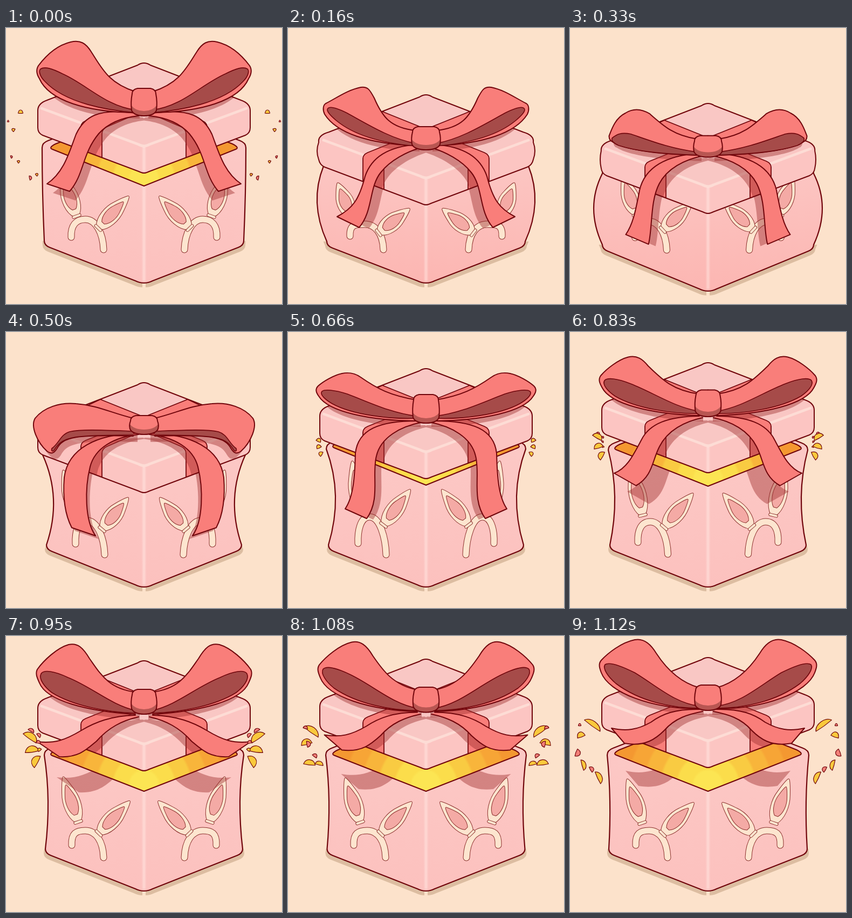
An HTML page with a canvas for the animation above (1.29 s loop, 512 by 512 pixels).

```html
<!DOCTYPE html>
<html lang="en">
<head>
<meta charset="utf-8">
<title>Gift box</title>
<style>
html, body { margin: 0; height: 100%; overflow: hidden; background: #fce2cb; }
canvas { display: block; width: 100vw; height: 100vh; }
</style>
</head>
<body>
<canvas width="512" height="512"></canvas>
<script>
const ctx = document.querySelector('canvas').getContext('2d');
const LINE = '#70050b', CORAL = '#f97e7a', PINK = '#fcc5c2', CREAM = '#fde5cf', SHADE = 'rgba(160,50,50,.45)';

// Left half only; the right half is its mirror image.
// lid: top, bulge   body: corner x, y, waist x, foot x, y, apex   hole: tip y, apex y
// bunny: left base, tip, right base, tip, band end, crown, end   bits: x, y, length, width, angle
const open = {
  lid: [65, 0], body: [67, 216, 68, 71, 395, 473], hole: [222, 293], knot: [232, 112, 163], cast: [11, 17],
  bow: [240,118, 190,102,178,75,158,44, 148,28,138,22,120,26, 95,32,75,50,60,70, 55,78,57,86,62,94, 80,135,150,156,240,157],
  fold: [240,152, 185,145,150,105,105,85, 85,75,72,71,64,76, 60,80,63,90,72,99, 110,140,190,153,240,157],
  tail: [240,158, 170,148,145,165,130,197, 118,228,108,268,76,289, 118,303, 146,270,140,235,172,196, 190,176,215,166,246,163],
  bunny: [131,349, 103,272, 171,371, 228,312, 121,388, 147,355, 181,411],
  bits: [27,156,9,6,0, 14,189,6,5,-60, 23,248,5,4,60, 57,272,5,4,50, 4,173,3,3,0, 10,239,5,3,70, 45,278,8,4,80]
};
const land = {
  lid: [124, 4], body: [66, 250, 54, 72, 396, 473], hole: [254, 318], knot: [229, 183, 226], cast: [18, 2],
  bow: [236,190, 190,185,175,165,160,130, 152,115,148,108,135,110, 110,115,90,130,70,140, 65,143,64,152,68,160, 90,195,150,215,236,218],
  fold: [236,214, 190,205,150,180,110,158, 90,148,78,145,74,149, 70,153,78,162,90,172, 130,205,190,215,236,219],
  tail: [240,216, 185,220,155,240,143,275, 132,318,120,335,91,350, 132,370, 158,340,150,295,172,268, 190,245,220,230,246,222],
  bunny: [117,350, 92,287, 168,380, 226,335, 115,386, 142,364, 177,411],
  bits: []
};
const rise = {
  lid: [94, 0], body: [68, 222, 88, 75, 395, 473], hole: [225, 288], knot: [229, 155, 190], cast: [6, 6],
  bow: [236,160, 195,150,170,136,130,133, 100,130,70,140,54,160, 45,175,58,205,76,221, 84,227,89,225,94,217, 106,194,130,190,236,193],
  fold: [236,184, 180,182,140,180,118,185, 101,190,99,206,85,216, 83,222,88,223,91,217, 106,192,130,192,236,191],
  tail: [240,188, 170,190,115,215,108,270, 105,310,110,340,122,363, 166,378, 146,350,146,290,156,250, 165,215,200,195,246,190],
  bunny: [133,340, 106,256, 178,366, 227,307, 129,393, 150,350, 183,413],
  bits: []
};
const pop = {
  lid: [68, 0], body: [71, 211, 88, 75, 395, 473], hole: [212, 284], knot: [231, 116, 169], cast: [12, 2],
  bow: [238,126, 190,118,165,105,135,84, 125,77,115,74,100,77, 85,80,65,92,56,100, 50,106,52,112,57,119, 75,148,150,164,238,165],
  fold: [238,156, 190,150,150,130,110,115, 85,107,68,106,63,110, 58,116,70,126,82,133, 120,154,190,162,238,160],
  tail: [240,165, 170,165,130,180,125,225, 124,265,122,305,106,328, 146,346, 172,310,155,265,164,230, 172,195,210,175,246,168],
  bunny: [136,335, 119,239, 177,358, 227,292, 130,392, 151,343, 182,413],
  bits: [57,201,9,6,25, 57,213,9,6,-25, 61,226,9,6,-60, 61,215,0,0,0, 58,200,0,0,30, 61,206,0,0,45, 61,210,0,0,60]
};
const fling = {
  lid: [46, 0], body: [71, 215, 78, 73, 395, 473], hole: [219, 288], knot: [232, 99, 145], cast: [36, 66],
  bow: [240,104, 190,98,175,70,155,42, 143,22,133,12,116,16, 95,22,70,45,58,62, 54,70,58,78,62,87, 75,120,150,140,240,145],
  fold: [240,138, 195,128,160,95,115,77, 90,65,70,62,65,70, 60,80,72,95,85,105, 125,130,190,142,240,143],
  tail: [240,147, 195,148,165,160,140,175, 110,193,90,200,58,196, 99,224, 135,226,150,210,168,195, 190,170,215,157,246,150],
  bunny: [134,345, 106,261, 172,366, 230,306, 122,388, 147,361, 181,411],
  bits: [46,187,30,11,35, 48,211,26,11,-8, 55,232,24,11,-62, 62,211,7,5,-40, 47,175,12,5,30, 61,184,9,5,50, 60,197,8,5,15]
};
const peak = {
  lid: [40, 0], body: [69, 215, 74, 72, 395, 473], hole: [218, 288], knot: [231, 91, 138], cast: [26, 79],
  bow: [240,96, 200,85,175,55,160,32, 148,12,135,4,120,7, 95,12,70,32,58,45, 52,52,55,60,58,68, 72,105,150,135,240,135],
  fold: [240,130, 195,125,160,92,120,68, 90,53,72,48,65,53, 60,60,70,75,85,88, 130,122,190,134,240,134],
  tail: [240,136, 195,135,170,145,150,160, 125,174,105,177,77,171, 101,199, 140,206,160,190,175,175, 195,152,220,145,246,140],
  bunny: [134,347, 106,265, 172,367, 230,309, 122,388, 147,361, 181,411],
  bits: [43,164,36,9,36, 20,184,15,9,-20, 25,239,20,7,75, 54,262,24,8,65, 18,165,5,4,0, 14,217,14,8,110, 40,247,11,6,60]
};

const mix = (a, b, t) => Object.fromEntries(Object.keys(a).map(k => [k, a[k].map((v, i) => v + (b[k][i] - v) * t)]));
const squash = { ...mix(land, rise, .4), body: [60, 264, 44, 60, 402, 488], hole: [266, 334], drop: 28 };

// Each pose is held until its end time.
const steps = [
  [160, open], [330, land], [500, squash], [660, rise], [830, pop],
  [950, mix(pop, fling, .5)], [1080, fling], [1120, mix(fling, peak, .5)], [1290, peak]
];

function curve(n, cmds) {
  let i = 2, d = `M${n[0]} ${n[1]}`;
  for (const c of cmds) d += c + n.slice(i, i += c === 'C' ? 6 : 2).join(' ');
  return new Path2D(d);
}

function paint(path, fill, stroke, width = 2) {
  if (fill) { ctx.fillStyle = fill; ctx.fill(path); }
  if (stroke) { ctx.strokeStyle = stroke; ctx.lineWidth = width; ctx.stroke(path); }
}

function both(draw, dy = 0) {
  for (const side of [1, -1]) {
    ctx.setTransform(side, 0, 0, 1, side < 0 ? 512 : 0, dy);
    draw();
  }
  ctx.resetTransform();
}

function shadow(clip, path, dx, dy) {
  ctx.save();
  ctx.clip(clip);
  ctx.translate(dx, dy);
  paint(path, SHADE);
  ctx.restore();
}

function bodyPath([x, y, waist, foot, fy, apex]) {
  return new Path2D(`M256 ${y - 76} L${x + 11} ${y - 7} Q${x} ${y - 3} ${x} ${y + 6}
    Q${2 * waist - (x + foot) / 2} ${(y + fy) / 2} ${foot} ${fy} Q${foot} ${fy + 8} ${foot + 10} ${fy + 12}
    L240 ${apex - 4} Q248 ${apex} 256 ${apex}`);
}

function lidPath([t, b]) {
  return new Path2D(`M256 ${t} Q250 ${t} 244 ${t + 4} L76 ${t + 69} Q${59 - b} ${t + 75} ${59 - b / 2} ${t + 88}
    Q${59 - 2 * b} ${t + 104} ${59 - b / 2} ${t + 120} Q59 ${t + 130} 68 ${t + 134} L246 ${t + 201} Q252 ${t + 204} 256 ${t + 204}`);
}

function ear(bx, by, tx, ty) {
  const l = Math.hypot(tx - bx, ty - by);
  const leaf = (o, k) => {
    const p = (f, w) => `${(o + f * k) * l} ${w * k} `, L = s =>
      `${p(.15, 17 * s)}${p(.45, 19 * s)}${p(.68, 12 * s)}`;
    return new Path2D(`M${p(0, -5)}C${L(-1)}Q${p(.9, -6)}${p(.98, -2)}Q${p(1.02, 0)}${p(.98, 2)}
      Q${p(.9, 6)}${p(.68, 12)}C${p(.45, 19)}${p(.15, 17)}${p(0, 5)}Z`);
  };
  ctx.save();
  ctx.translate(bx, by);
  ctx.rotate(Math.atan2(ty - by, tx - bx));
  paint(leaf(0, 1), CREAM, '#8a2f2c', 1);
  paint(leaf(.16, .66), '#f4aaa5', '#8a2f2c', 1);
  const cuff = new Path2D('M0 -6V6');
  paint(cuff, 0, '#8a2f2c', 6);
  paint(cuff, 0, CREAM, 4.2);
  ctx.restore();
}

function bunny([a, b, c, d, e, f, g, h, x1, y1, x, y, x2, y2]) {
  const band = new Path2D(`M${x1} ${y1} C${x1 - 1} ${y1 - 22} ${x - 17} ${y} ${x} ${y} C${x + 20} ${y} ${x2 - 1} ${y2 - 30} ${x2} ${y2}`);
  paint(band, 0, '#8a2f2c', 13);
  paint(band, 0, CREAM, 11);
  ear(a, b, c, d);
  ear(e, f, g, h);
}

function bits(n) {
  for (let i = 0; i < n.length; i += 5) {
    const [x, y, l, w, a] = n.slice(i, i + 5);
    if (l < 1) continue;
    ctx.save();
    ctx.translate(x, y);
    ctx.rotate(a * Math.PI / 180);
    paint(new Path2D(`M${-l / 2} ${w / 3} C${-l / 3} ${-w} ${l / 3} ${-w} ${l / 2} ${w / 3} Q0 ${w / 2} ${-l / 2} ${w / 3}Z`),
      i < 20 ? '#f9c93c' : '#f27f78', LINE, 1.2);
    ctx.restore();
  }
}

function glow(apex) {
  const g = ctx.createRadialGradient(256, apex - 12, 0, 256, apex - 12, 180);
  ['#fce553', '#fbdd4b', '#f9cb42', '#f8b53b', '#f7a536', '#f49831'].forEach((c, i) => {
    g.addColorStop(i / 6, c);
    g.addColorStop(i / 6 + .14, c);
  });
  return g;
}

function shine(y0, y1) {
  for (const [w, a] of [[4, .3], [8, .2]]) {
    ctx.fillStyle = `rgba(255,235,228,${a})`;
    ctx.fillRect(256 - w / 2, y0, w, y1 - y0);
  }
}

function drawBody(p) {
  const box = bodyPath(p.body), tail = curve(p.tail, 'CCLCC'), [tip, apex] = p.hole, foot = p.body[5];
  both(() => {
    ctx.translate(-3, 8);
    ctx.save();
    ctx.beginPath();
    ctx.rect(0, p.body[4] - 8, 259, 120);
    ctx.clip();
    paint(box, '#dcbda1');
    ctx.restore();
  });
  const tone = ctx.createLinearGradient(0, 220, 0, foot);
  tone.addColorStop(0, '#fcc8c5');
  tone.addColorStop(1, p.lid[1] > 1 ? '#fcb6b2' : '#fcc1be');
  both(() => paint(box, tone, LINE, 2.2));
  shine(apex, foot - 4);
  both(() => {
    bunny(p.bunny);
    shadow(box, tail, p.cast[0], p.cast[1] + (p.drop || 0));
  });
  const gold = glow(apex);
  both(() => paint(new Path2D(`M256 ${tip - 72} L92 ${tip - 7} Q78 ${tip} 86 ${tip + 3} L256 ${apex}`), gold, LINE));
}

function drawLid(p) {
  const lid = lidPath(p.lid), t = p.lid[0], dy = p.drop || 0;
  const bow = curve(p.bow, 'CCCCC'), fold = curve(p.fold, 'CCCC'), tail = curve(p.tail, 'CCLCC');
  both(() => paint(lid, PINK), dy);
  both(() => {
    paint(new Path2D(`M256 ${t} L66 ${t + 79} L256 ${t + 154}`), '#f9c7c4');
    paint(new Path2D(`M66 ${t + 84} L246 ${t + 151} Q252 ${t + 154} 256 ${t + 154}`), 0, '#fddcd5', 5);
  }, dy);
  shine(t + 156 + dy, t + 201 + dy);
  both(() => {
    ctx.save();
    ctx.clip(new Path2D(`M0 ${t + 98} L256 ${t} L512 ${t + 98} V${t + 110} L256 ${t + 204} L0 ${t + 110}Z`));
    paint(new Path2D(`M139 ${t + 165} V${t + 118} Q139 ${t + 111} 148 ${t + 107} L337 ${t + 31} L362 ${t + 43}
      L188 ${t + 118} Q178 ${t + 122} 178 ${t + 132} V${t + 180}`), CORAL, LINE, 1.8);
    ctx.restore();
  }, dy);
  both(() => {
    shadow(lid, tail, 14, 8);
    shadow(lid, bow, 8, 11);
    paint(lid, 0, LINE);
  }, dy);
  both(() => paint(tail, CORAL, LINE), dy);
  both(() => {
    paint(bow, CORAL, LINE);
    paint(fold, '#a64b49', LINE, 1.6);
  }, dy);
  const [x, y0, y1] = p.knot;
  const knot = new Path2D(`M256 ${y0} H${x + 12} Q${x + 2} ${y0 + 2} ${x + 2} ${y0 + 10}
    Q${x - 1} ${(y0 + y1) / 2} ${x + 1} ${y1 - 10} Q${x + 6} ${y1} 256 ${y1}`);
  both(() => {
    paint(knot, CORAL);
    ctx.save();
    ctx.clip(knot);
    paint(new Path2D(`M${x} ${y1 - 20} Q${x + 8} ${y1 - 9} 256 ${y1 - 9} V${y1 + 2} H${x}Z`), '#b85652');
    ctx.restore();
    paint(knot, 0, LINE);
  }, dy);
}

function frame() {
  const t = performance.now() % 1290, p = steps.find(s => t < s[0])[1];
  ctx.resetTransform();
  ctx.lineJoin = ctx.lineCap = 'round';
  ctx.fillStyle = '#fce2cb';
  ctx.fillRect(0, 0, 512, 512);
  drawBody(p);
  drawLid(p);
  both(() => bits(p.bits));
  requestAnimationFrame(frame);
}
frame();
</script>
</body>
</html>
```
